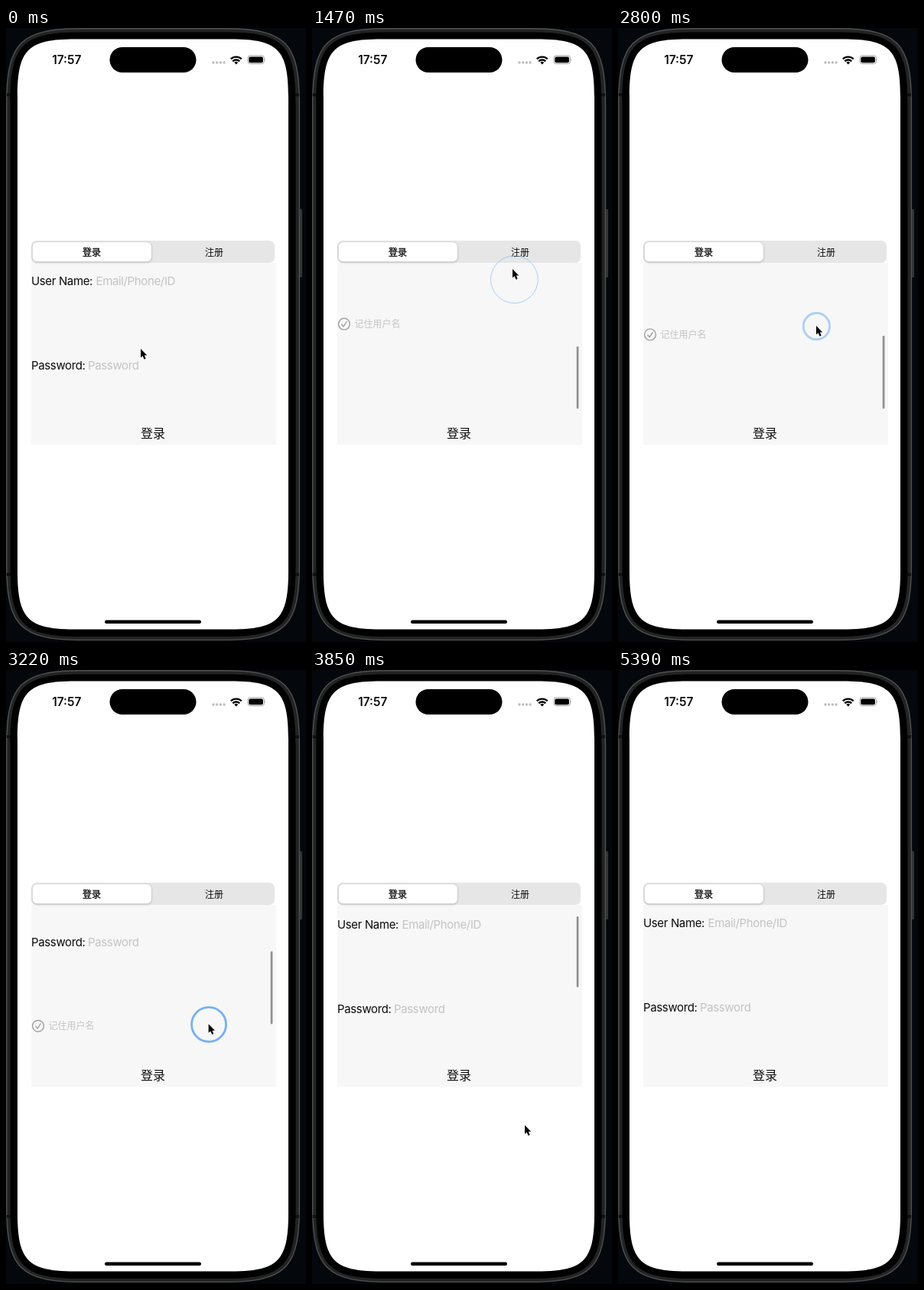
An HTML page for the animation above (6300 ms loop, 392 by 800 pixels).

```html
<!DOCTYPE html>
<html lang="zh">
<head>
<meta charset="utf-8">
<title>Login form</title>
<style>
  html, body { margin: 0; width: 100%; height: 100%; overflow: hidden; background: #04080c; }
  svg { display: block; width: 392px; height: 800px; }
  text { font-family: Inter, "Noto Sans CJK SC", "Noto Sans CJK", sans-serif; fill: #0b0b0b; }
  .cjk { font-family: "Noto Sans CJK SC", "Noto Sans CJK", sans-serif; font-size: 12px; text-anchor: middle; }
  .tab { font-weight: 500; }
  .active { stroke: #0b0b0b; stroke-width: .3px; }
  .submit { font-size: 16px; }
  .clock { font-size: 15.5px; font-weight: 600; text-anchor: middle; }
  .field { font-size: 15px; letter-spacing: -.36px; }
  .hint { fill: #c3c3c5; }
  .knob { fill: #fff; stroke: #0000000f; filter: drop-shadow(0 1px 1.5px #0003); }
</style>
</head>
<body>
<svg viewBox="0 0 392 800">
  <defs>
    <clipPath id="view"><rect x="33" y="317" width="320" height="181"/></clipPath>
  </defs>

  <!-- phone body -->
  <rect x="382" y="236" width="5" height="89" rx="1.5" fill="#333"/>
  <path id="shell" fill="#222323" stroke="#505151" stroke-width="1.4"/>
  <path d="M1 87H6M1 712H6M378 87H383M378 712H383" stroke="#111" stroke-width="4"/>
  <path id="bezel"/>
  <path id="screen" fill="#fff"/>
  <rect x="135.5" y="25" width="113" height="33" rx="16.5"/>
  <rect x="129" y="771.5" width="126" height="4.5" rx="2.25"/>

  <!-- status bar -->
  <text class="clock" x="79.3" y="46.7">17:57</text>
  <path d="M271 45H286" stroke="#bdbdbd" stroke-width="3.4" stroke-linecap="round" stroke-dasharray="0 4.7"/>
  <g fill="none" stroke="#000" stroke-width="2.4">
    <path d="M293.8 40.4a10 10 0 0 1 13.9 0"/>
    <path d="M296.3 43.4a6.3 6.3 0 0 1 8.9 0"/>
  </g>
  <path d="M300.75 47.4l-2.4-2.5a3.4 3.4 0 0 1 4.8 0z"/>
  <rect x="315.9" y="36" width="21.6" height="10.6" rx="3.2" fill="none" stroke="#a2a2a2"/>
  <rect x="317.3" y="37.5" width="18.6" height="7.7" rx="1.9"/>
  <path d="M338.6 39.5q1.6 1.8 0 3.6z" fill="#a2a2a2"/>

  <!-- form -->
  <rect x="33" y="306" width="320" height="237" fill="#f7f7f7"/>
  <rect x="33" y="277" width="318" height="29" rx="7" fill="#e6e6e7"/>
  <rect class="knob" x="34.5" y="279" width="155.5" height="25.5" rx="6"/>
  <text class="cjk tab active" x="112" y="296.5">登录</text>
  <text class="cjk tab" x="272" y="296.5">注册</text>

  <g clip-path="url(#view)">
    <g id="rows">
      <text class="field" x="33" y="334.5">User Name:</text>
      <text class="field hint" x="117.5" y="334.5">Email/Phone/ID</text>
      <text class="field" x="33" y="444.5">Password:</text>
      <text class="field hint" x="107" y="444.5">Password</text>
      <g fill="none" stroke="#a0a0a0" stroke-width="1.4" stroke-linecap="round" stroke-linejoin="round">
        <circle cx="42" cy="548.5" r="7.4"/>
        <path d="M38.8 549l2.4 2.8 4-6.2"/>
      </g>
      <text class="cjk hint" x="85.5" y="553">记住用户名</text>
    </g>
  </g>
  <rect id="bar" x="345.7" width="2.7" rx="1.35" fill="#919191"/>
  <text class="cjk submit" x="192" y="534">登录</text>

  <!-- pointer -->
  <circle id="ring" fill="none" stroke="#75b1f4"/>
  <path id="cursor" d="M0 0V11.6L2.6 9.3 4.6 13.7 6.7 12.8 4.8 8.5H8.3Z" stroke="#fff" stroke-width="1.4" paint-order="stroke"/>
</svg>

<script>
  const LOOP = 6300, STEP = 70;
  const MAX_SCROLL = 149, SLOP = 9.5, SPRING = 8;
  const $ = id => document.getElementById(id);
  const clamp = v => Math.min(1, Math.max(0, v));
  const glide = p => p * p * (3 - 2 * p);
  const pull = p => p ** 1.65;
  const coast = p => 1 - (1 - p) ** 2;

  // pointer stops; ease shapes the way to each stop
  const stops = [
    { t: 0, x: 176, y: 418 },
    { t: 840, x: 272, y: 449, ease: glide },
    { t: 1330, x: 264, y: 327, ease: pull },
    { t: 1470, x: 262, y: 314, ease: coast },
    { t: 2800, x: 259, y: 388, ease: glide },
    { t: 3430, x: 270, y: 531, ease: pull },
    { t: 3850, x: 278, y: 593, ease: coast },
    { t: 4480, x: 402, y: 575, ease: glide }
  ];

  // speed is the flick in px/s at release, rest is where the list settles
  const drags = [
    { down: 700, up: 1330, speed: 890, rest: MAX_SCROLL },
    { down: 2730, up: 3430, speed: -330, rest: 0 }
  ];

  function set(el, attrs) {
    for (const name in attrs) el.setAttribute(name, attrs[name]);
  }

  // rectangle with continuous corners
  function squircle(x, y, w, h, r) {
    const e = 1.528 * r, c = .272 * r, across = w - 2 * e, along = h - 2 * e;
    return `M${x + e} ${y}h${across}c${e - c} 0 ${e} ${c} ${e} ${e}` +
      `v${along}c0 ${e - c} ${-c} ${e} ${-e} ${e}` +
      `h${-across}c${c - e} 0 ${-e} ${-c} ${-e} ${-e}` +
      `v${-along}c0 ${c - e} ${c} ${-e} ${e} ${-e}z`;
  }

  function pointer(t) {
    const i = stops.findIndex(s => s.t > t);
    if (i < 0) return stops[stops.length - 1];
    const a = stops[i - 1], b = stops[i];
    const p = b.ease((t - a.t) / (b.t - a.t));
    return { x: a.x + (b.x - a.x) * p, y: a.y + (b.y - a.y) * p };
  }

  function scrollAt(t) {
    let base = 0, scroll = 0;
    for (const { down, up, speed, rest } of drags) {
      if (t < down) break;
      const dy = pointer(down).y - pointer(Math.min(t, up)).y;
      scroll = base + Math.sign(dy) * Math.max(0, Math.abs(dy) - SLOP);
      if (t > up) {
        // critically damped spring after release
        const s = (t - up) / 1000, gap = scroll - rest;
        scroll = rest + (gap + (speed + SPRING * gap) * s) * Math.exp(-SPRING * s);
      }
      base = rest;
    }
    return scroll;
  }

  function drawScroll(t) {
    const scroll = scrollAt(t);
    set($('rows'), { transform: `translate(0 ${-scroll})` });
    // the bar shrinks against the end it is pushed into
    const inside = MAX_SCROLL * clamp(scroll / MAX_SCROLL);
    const over = scroll - inside;
    set($('bar'), {
      y: 321 + inside / MAX_SCROLL * 80 + Math.max(0, over),
      height: 95 - Math.abs(over),
      opacity: clamp((t - 840) / 140) * clamp((4200 - t) / 210)
    });
  }

  function drawRing(t) {
    const press = drags.find(d => t >= d.down && t < d.up + 210);
    if (!press) return set($('ring'), { opacity: 0 });
    const { x, y } = pointer(Math.min(t, press.up));
    const grow = clamp((t - press.down) / 210), fade = clamp((t - press.up) / 210);
    set($('ring'), {
      cx: x + .4, cy: y + .6,
      r: 14.5 + 8 * grow + 12.5 * fade,
      'stroke-width': 2.8 - 2.7 * fade,
      opacity: clamp(.3 + grow * .8) * (1 - fade * .6)
    });
  }

  function draw(now) {
    const t = Math.floor(now % LOOP / STEP) * STEP;
    const { x, y } = pointer(t);
    drawScroll(t);
    drawRing(t);
    set($('cursor'), { transform: `translate(${x} ${y})` });
    requestAnimationFrame(draw);
  }

  set($('shell'), { d: squircle(.8, .8, 382.6, 796.6, 65) });
  set($('bezel'), { d: squircle(5.5, 5.5, 373, 787.5, 60) });
  set($('screen'), { d: squircle(15, 14.5, 354, 769, 49.5) });
  draw(performance.now());
</script>
</body>
</html>
```
